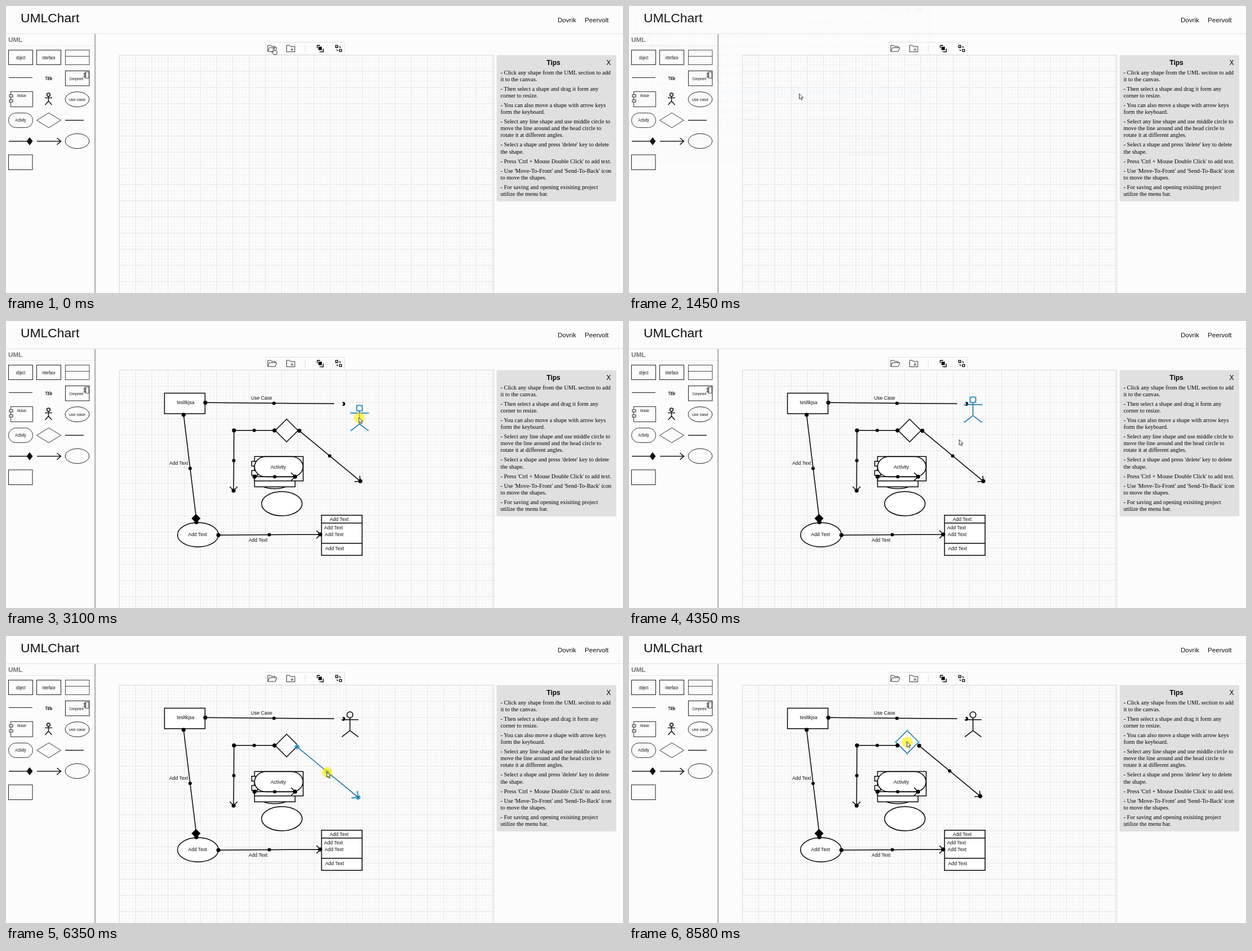
Recreate the animation shown at these times as an HTML page. Size 1096x511 px, loop 8630 ms.

```html
<!DOCTYPE html>
<html lang="en">
<head>
<meta charset="utf-8">
<title>UMLChart</title>
<style>
  html, body { margin: 0; width: 100%; height: 100%; overflow: hidden; background: #fcfcfc; }
  svg { display: block; width: 100vw; height: 100vh; }
  text { font-family: "Liberation Sans", Arial, sans-serif; fill: #111; stroke: none; white-space: pre; }
  .tips text { font-family: "Liberation Serif", "Times New Roman", serif; font-size: 10.36px; fill: #000; }
  .tips .head { font-family: "Liberation Sans", Arial, sans-serif; font-size: 12px; }
  .dialog text { font-family: "Open Sans", "Noto Sans", sans-serif; font-size: 8.2px; fill: #222; }
  .dialog .dim { fill: #5d6b7c; }
  .diagram text { font-size: 8.64px; }
  .shape { color: #000; stroke: currentColor; }
  .handle { display: none; fill: #d3efff; stroke: #1b95d2; stroke-width: .8; }
  .selected { color: #126c9e; }
  .selected .handle { display: inline; }
</style>
</head>
<body>
<svg viewBox="0 0 1096 511" preserveAspectRatio="none">
  <g id="page"></g>
  <g id="diagram" class="diagram" fill="none" stroke="#000" stroke-width="1.5"></g>
  <g id="dialog" class="dialog"></g>
  <circle id="glow" r="9.5" fill="#ffee00" opacity=".65"/>
  <g id="cursor" stroke="#222" stroke-width=".9" stroke-linejoin="round" fill="#fff">
    <path id="arrow" d="M0 0V9.6L2.2 7.6 3.8 11.2 5.4 10.5 3.9 7H7Z"/>
    <path id="hand" d="M-.9 1Q0-.6 1 1V5Q2 4.2 2.7 5.2 3.8 4.6 4.4 5.7 5.9 5.4 5.9 7V9.3L4.9 12H.2L-3.4 7.6Q-3.2 6.2-1.9 6.9L-.9 7.8Z"/>
  </g>
</svg>
<script>
const LOOP = 8630;
const $ = id => document.getElementById(id);

// Markup helpers
const rect = (x, y, w, h, extra = '') => `<rect x="${x}" y="${y}" width="${w}" height="${h}" ${extra}/>`;
const path = (d, extra = '') => `<path d="${d}" ${extra}/>`;
const dot = (x, y, r = 3.6) => `<circle cx="${x}" cy="${y}" r="${r}" fill="currentColor" stroke="none"/>`;
const oval = (x, y, rx, ry, extra = '') => `<ellipse cx="${x}" cy="${y}" rx="${rx}" ry="${ry}" ${extra}/>`;
const text = (x, y, s, extra = '') => `<text x="${x}" y="${y}" ${extra}>${s}</text>`;
const handle = (x, y) => rect(x - 1.1, y - 1.1, 2.2, 2.2, 'class="handle"');
const rhomb = (x, y, rx, ry, extra) =>
  path(`M${x - rx} ${y}L${x} ${y - ry}L${x + rx} ${y}L${x} ${y + ry}Z`, extra);

function header() {
  return rect(0, 0, 1096, 511, 'fill="#fcfcfc"') +
    text(26, 29, 'UMLChart', 'font-size="22.9"') +
    text(980, 29, 'Dovrik', 'font-size="11.6"') +
    text(1028, 29, 'Peervolt', 'font-size="11.6"') +
    path('M0 49.3H1096', 'stroke="#e2e2e2"') +
    path('M158.2 50V511', 'stroke="#8c8c8c" stroke-width="1.44"') +
    text(4, 63.5, 'UML', 'font-size="11.8" font-weight="bold" style="fill:#77776f"') +
    path('M0 70.5H157', 'stroke="#e8e8e8"');
}

function palette() {
  // The palette pictures are squeezed sideways, lettering included
  const label = (x, y, s, size, extra = '') =>
    `<g transform="translate(${x} ${y}) scale(.72 1)">` +
    text(0, 0, s, `font-size="${size}" text-anchor="middle" ${extra}`) + '</g>';
  return '<g fill="none" stroke="#1c1c1c" stroke-width="1">' +
    rect(4.5, 78.5, 43, 26) + rect(54.5, 78.5, 43, 26) +
    rect(105.5, 78.5, 42.5, 26, 'stroke-width=".8"') + path('M105.5 89.5H148', 'stroke-width=".8"') +
    path('M5 127.5H47', 'stroke-width="1.1"') +
    rect(105.5, 115.5, 42.5, 26.5) +
    path('M140.5 117.5H147V128.5H140.5ZM138.5 119.5H142V122H138.5ZM138.5 124H142V126.5H138.5Z', 'stroke-width=".8"') +
    rect(8.5, 152.5, 39, 27, 'stroke-width=".9"') +
    rect(6, 158, 6, 4, 'fill="#fcfcfc"') + rect(6, 167, 6, 4, 'fill="#fcfcfc"') +
    '<g stroke-width="1.6"><circle cx="75.5" cy="158" r="2.9"/>' +
    path('M75.5 161V169.5M69 163.5H82M69.5 176L75.5 169.5 81.5 176') + '</g>' +
    oval(126.5, 166.2, 21.3, 13.4) +
    rect(4.5, 190.5, 43, 26, 'rx="13" stroke-width=".9"') +
    rhomb(76, 203.5, 21.5, 13.2, 'stroke-width=".9"') +
    path('M105 203.5H138M5 240.8H40M55 240.8H97M90.5 235L97.5 240.8 90.5 246.8', 'stroke-width="1.6"') +
    rhomb(42, 240.8, 5, 6.6, 'fill="#111"') +
    oval(126.5, 240.5, 21.3, 13.2) +
    rect(4.5, 265, 42.5, 26.5) + '</g>' +
    label(26, 94.5, 'object', 8.5) + label(76, 94.5, 'interface', 8.5) +
    label(76, 131.5, 'Title', 8.5, 'font-weight="bold"') +
    label(125, 132, 'Component', 6.8) + label(28, 161.5, 'Module', 6.8) +
    label(26, 205.8, 'Activity', 8.5) +
    text(126.5, 168.8, 'use case', 'font-size="7.2" text-anchor="middle"');
}

function grid() {
  const lines = (step, color) => {
    let d = '';
    for (let x = 201.5 + step; x < 866; x += step) d += `M${x.toFixed(2)} 88V511`;
    for (let y = 87.5 + step; y < 511; y += step) d += `M202 ${y.toFixed(2)}H866`;
    return path(d, `stroke="${color}" stroke-width=".7"`);
  };
  return lines(5.76, '#f3f3f3') + lines(28.8, '#dfdfdf') +
    path('M201.5 511V87.5H866.5V511', 'fill="none" stroke="#d6d6d6"');
}

function toolbar() {
  const folder = x => path(`M${x} 81V70.2H${x + 5.5}L${x + 7} 72H${x + 13}V74`);
  return rect(461.5, 64.5, 140, 22.5, 'fill="#fcfcfc" stroke="#e2e2e2"') +
    '<g fill="none" stroke="#333" stroke-width="1" stroke-linejoin="round">' +
    folder(465) + path('M465 81L468 74.2H481L478.3 81Z') +
    path('M498.5 81.5V70H503.5L505 72H513V81.5ZM508 74.5V79M505.8 77L508 79.3 510.2 77') + '</g>' +
    path('M531.5 69V82', 'stroke="#dcdcdc"') +
    rect(555, 72.5, 6, 6, 'fill="#000"') +
    '<g fill="none" stroke="#000" stroke-width="1.4">' +
    path('M553 75V70.2H558M558.5 81.5H563.5V76M557 81.5H558') +
    path('M585.6 70.2H589.4V74H585.6ZM592.4 77.4H596.2V81.2H592.4Z', 'stroke-width="1.3"') +
    path('M591.5 72.5H593.6V75M588 77V79.2H590.2', 'stroke-width="1.1"') + '</g>';
}

function tips() {
  const rows = [
    [118, '- Click any shape from the UML section to add'], [130, 'it to the canvas.'],
    [147.5, '- Then select a shape and drag it form any'], [159.7, 'corner to resize.'],
    [176.2, '- You can also move a shape with arrow keys'], [188.4, 'form the keyboard.'],
    [205.4, '- Select any line shape and use middle circle to'], [217.5, 'move the line around and the head circle to'],
    [229.7, 'rotate it at different angles.'],
    [246.8, "- Select a shape and press 'delete' key to delete"], [259, 'the shape.'],
    [276, "- Press 'Ctrl + Mouse Double Click' to add text."],
    [293, "- Use 'Move-To-Front' and 'Send-To-Back' icon"], [305, 'to move the shapes.'],
    [322, '- For saving and opening exisiting project'], [334.3, 'utilize the menu bar.']
  ];
  return '<g class="tips">' + rect(871.5, 87.5, 212.5, 260.5, 'rx="2" fill="#e0e0e0"') +
    text(972.5, 104.6, 'Tips', 'class="head" font-weight="bold" text-anchor="middle"') +
    text(1070.5, 104.6, 'X', 'class="head" text-anchor="middle"') +
    rows.map(([y, s]) => text(878.5, y + 3.5, s.replace(/^-/, '<tspan font-weight="bold">-</tspan>'))).join('') + '</g>';
}

function diagram() {
  const white = 'fill="#fff"';
  return rect(281.5, 128.5, 72, 36.5, white) + text(303.5, 148.3, 'tesltkjsa') +
    path('M354 145.3L583 147.3') + dot(354, 145.3) + dot(476, 146.4, 3) + text(435, 140.2, 'Use Case') +
    dot(599, 147.4, 3.5) + '<circle cx="596.2" cy="147.4" r="2.8" fill="#fcfcfc" stroke="none"/>' +
    oval(341, 380.7, 36.3, 21.6, white) + text(323.5, 382.7, 'Add Text') +
    path('M315.5 167L338 352') + dot(315.5, 167) + dot(327, 262.5, 3) +
    rhomb(337.5, 351.5, 7, 7, 'fill="#000"') + dot(338.2, 358.2) + text(290, 256.2, 'Add Text') +
    rect(560.5, 345.8, 72, 71.5, white) + path('M560.5 359.8H632.5M560.5 395.8H632.5') +
    text(575, 356.3, 'Add Text') + text(565, 371, 'Add Text') + text(566, 382.6, 'Add Text') + text(567, 408, 'Add Text') +
    path('M377 381.3L558 380M551.5 373.2L558.5 380 551.5 387') + dot(377.3, 381.2) + dot(467.7, 380.6, 3) + dot(558, 380) +
    text(431, 392.6, 'Add Text') +
    oval(490, 325.3, 36, 21.5, white) + oval(477, 277, 36, 21.6, white) +
    rect(441.5, 259, 72, 36.3, white) + rect(441.5, 241.3, 86.3, 43.4, white) +
    rect(436.5, 249.8, 10.5, 8.5, white) + rect(436.5, 266.3, 10.5, 8.5, white) +
    rect(441.5, 241.5, 86, 36, 'rx="20" fill="#fff"') + text(470, 263.2, 'Activity') +
    path('M441.5 277.2H513.5M506.5 270L513.5 277.2 506.5 284.2') + dot(441.5, 277.2) + dot(477.3, 277.2, 3) + dot(513.5, 277.2) +
    '<g id="diamond" class="shape">' + rhomb(498.5, 195, 20.3, 20.3, white) +
    handle(478.2, 195) + handle(518.8, 195) + handle(498.5, 174.7) + handle(498.5, 215.3) + '</g>' +
    path('M405 194.8H477M405 194.8L404.3 302M397.5 295L404.3 302 411 295') +
    dot(405, 194.8) + dot(441, 194.8, 3) + dot(477, 194.8) + dot(404.7, 248.5, 3) + dot(404.3, 302) +
    '<g id="link" class="shape">' + path('M521 195.3L629.3 285.2M628.3 275.5L629.3 285.2 619 286.2') +
    dot(521, 195.3) + dot(575, 240.2, 3) + dot(629.3, 285.2) +
    [[521, 195.3], [575, 240.2], [629.3, 285.2]].map(([x, y]) =>
      handle(x - 3, y) + handle(x + 3, y) + handle(x, y - 3) + handle(x, y + 3)).join('') +
    handle(628.3, 275.5) + handle(619.5, 286.2) + '</g>' +
    '<g id="actor" class="shape"><circle cx="611" cy="140.3" r="5.3"/>' +
    path('M611 145.6V168.5M596.3 149H626M596.5 179.7L611 168.5 625.8 179.7') +
    [[596.3, 149], [626, 149], [596.5, 179.7], [625.8, 179.7], [606.7, 136], [615.3, 136], [606.7, 144.6], [615.3, 144.6]]
      .map(p => handle(...p)).join('') + '</g>';
}

function dialog() {
  const chevron = (x, y, a, b) => path(`M${x - a} ${y - b}L${x} ${y}L${x + a} ${y - b}`, 'fill="none" stroke="#555"');
  const side = (x, y, s) => path(`M${x + s} ${y - 2.5}L${x} ${y}L${x + s} ${y + 2.5}`, 'fill="none" stroke="#555"');
  const places = [
    [72, '3D Objects', '#2f9fd8'], [89, 'Desktop', '#1c8ad8'], [106, 'Documents', '#8fa7b8'],
    [123, 'Downloads', '#2b82cf'], [140, 'Music', '#2b8fdc'], [157, 'Pictures', '#5fa3c6'],
    [174, 'Videos', '#4a5560'], [191.5, 'Local Disk (C:)', '#8b98a3'], [209, 'Personal (D:)', '#70777d']
  ];
  const icon = (name, y, c) => {
    if (name === 'Downloads') return path(`M30.5 ${y - 4.5}H34.5V${y}H37.5L32.5 ${y + 5}L27.5 ${y}H30.5Z`, `fill="${c}"`);
    if (name === 'Music') return oval(31, y + 3, 2, 1.7, `fill="${c}"`) + path(`M32.5 ${y + 3}V${y - 5}L35.5 ${y - 1}`, `fill="none" stroke="${c}" stroke-width="1.4"`);
    if (name === 'Desktop') return rect(27, y - 4, 11, 8, `fill="${c}"`);
    if (name.endsWith(':)')) return rect(27.5, y + 1, 10, 3, `fill="${c}"`);
    const tall = name === 'Documents' || name === 'Videos';
    return rect(tall ? 28 : 27, y - (tall ? 4.5 : 3.5), tall ? 8.5 : 10.5, tall ? 9.5 : 7.5, `fill="${c}"`) +
      path(`M29.5 ${y + 1}H35`, 'stroke="#fff" stroke-width="1.3"');
  };
  let files = rect(118, 148, 422, 17, 'fill="#cce8ff"');
  for (let i = 0; i < 10; i++) {
    const y = 54.5 + i * 17;
    files += rect(133, y - 4, 7, 8, 'fill="#e8eef3" stroke="#8a9aa8" stroke-width=".7"') +
      text(146, y + 3, 'project_' + (1586321840284 + i * 73911407)) +
      text(316, y + 3, `4/${8 + i}/2020 ${1 + i % 9}:${12 + i * 4} PM`, 'class="dim"') +
      text(419, y + 3, 'JSON File', 'class="dim"') + text(504, y + 3, 3 + i % 4 + ' KB', 'class="dim"');
  }
  const shadow = [1, 2, 3, 4, 5].map(n =>
    rect(3.5 - n * .7, -20, 539 + n * 1.7, 302.3 + n * 1.2, 'rx="2" fill="#000" opacity=".05"')).join('');
  return shadow +
    rect(3.5, -20, 539, 302.3, 'fill="#fff" stroke="#8f8f8f" stroke-width=".9"') +
    rect(4, -20, 538, 33.5, 'fill="#f6f7f8"') + rect(4, 226, 538, 56, 'fill="#f2f2f2"') +
    text(16, 9, 'Organize') + path('M53.5 4.8H58.5L56 7.3Z', 'fill="#444"') + text(79, 9, 'New folder') +
    path('M455 2.5H458M455 6H458M455 9.5H458M460 2.5H466M460 6H466M460 9.5H466', 'stroke="#9aa4ac" stroke-width="1.2"') +
    path('M473 4.5H478L475.5 7Z', 'fill="#444"') +
    rect(494, 2, 10, 8, 'fill="#fff" stroke="#52809e"') + rect(499.5, 3, 4, 6.5, 'fill="#4ba0df"') +
    '<circle cx="525" cy="6" r="6" fill="#1569b5"/>' + text(525, 9.2, '?', 'text-anchor="middle" font-weight="bold" style="fill:#fff"') +
    text(130, 30, 'Name', 'class="dim"') + text(316, 30, 'Date modified', 'class="dim"') +
    text(419, 30, 'Type', 'class="dim"') + text(504, 30, 'Size', 'class="dim"') +
    path('M312.5 18V36M415.5 18V36M500.5 18V36', 'stroke="#dedede"') +
    path('M360 20.5L363 18 366 20.5', 'fill="none" stroke="#888"') +
    '<circle cx="27" cy="31.5" r="4.5" fill="#1a72c4"/>' + text(35, 34.4, 'FogShelf') +
    rect(24.5, 50.5, 8, 6, 'fill="#4da3d9"') + path('M23.5 58.5H31', 'stroke="#6d7b86"') + text(35, 57.4, 'This PC') +
    rect(4, 114.3, 99, 17, 'fill="#d9d9d9"') +
    places.map(([y, s, c]) => icon(s, y, c) + text(41, y + 3, s)).join('') +
    rect(27.5, 187, 4, 4, 'fill="#2b9be0"') +
    rect(104, 18, 11, 206, 'fill="#f0f0f0"') + rect(104, 112, 10.5, 90, 'fill="#cdcdcd"') +
    path('M106.5 24.5L109.3 21.8 112 24.5', 'fill="none" stroke="#555"') + chevron(109.3, 219.5, 2.7, 2.7) +
    rect(118, 213, 422, 11, 'fill="#f0f0f0"') + rect(130, 213, 378.5, 10.5, 'fill="#cdcdcd"') +
    side(122, 218.3, 3) + side(537, 218.3, -3) +
    `<g id="wait">${text(302, 55, 'Working on it...', 'class="dim"')}</g><g id="files">${files}</g>` +
    text(127, 244.7, 'File name:', 'text-anchor="end"') +
    rect(130.5, 233.8, 256.5, 16, 'fill="#fff" stroke="#3f93d6"') + path('M132.5 236V247', 'stroke="#222" stroke-width=".8"') + chevron(381.5, 243, 2.6, 2.6) +
    rect(395.5, 233.8, 134.5, 15.5, 'fill="#e4e4e4" stroke="#adadad"') + text(398.5, 244.7, 'Custom Files') + chevron(524, 243, 2.6, 2.6) +
    rect(397, 255, 61, 16.8, 'fill="#e1e1e1" stroke="#0f78d1" stroke-width="1.5"') + text(427.5, 266.6, 'Open', 'text-anchor="middle"') +
    rect(467.5, 255, 62.5, 16.8, 'fill="#e1e1e1" stroke="#adadad"') + text(498.5, 266.6, 'Cancel', 'text-anchor="middle"') +
    path('M534 280L540 274M537 280L540 277', 'stroke="#aaa"');
}

$('page').innerHTML = header() + palette() + grid() + toolbar() + tips();
$('diagram').innerHTML = diagram();
$('dialog').innerHTML = dialog();

// Tracks: [ms, value, value]
const pointer = [[0, 475.5, 74.5], [700, 475.5, 74.5], [720, 475, 73], [1110, 475, 73], [1290, 302.5, 156], [1520, 302.5, 156],
  [1700, 540, 166], [1770, 540, 166], [1900, 566, 164], [2120, 610, 157], [4240, 610, 157], [4410, 574, 240],
  [6740, 574, 240], [6900, 503.5, 194.5]];
const actorMove = [[2410, 0, 0], [2600, 18, -16], [2800, 33, -9], [2950, 28, 7], [3100, 17, 15],
  [3220, 6, 7], [3290, 6, 7], [3480, 4, 0], [3730, 4, 0], [3990, 0, 0]];
const linkMove = [[4980, 0, 0], [5200, 16, 9], [5400, 33, 25], [5550, 32, 27], [5700, 20, 20], [5810, 10, 11],
  [5860, 10, 11], [6100, 2, 6], [6350, -4, 2], [6670, -5.5, 0]];
const diamondMove = [[7170, 0, 0], [7350, 33.5, 22], [7500, 46, 12], [7660, 40, -8], [7800, 25, -19],
  [8000, 12, -20], [8070, 12, -20], [8300, 3, -13], [8580, -4.3, -6.2]];
const fade = [[900, 0, .93], [960, .5, .97], [1030, .89, 1], [1090, 1, 1], [1380, 1, 1], [1450, .03, .965], [1520, 0, .95]];
const presses = [[340, 690], [1310, 1400], [2150, 3990], [4660, 6720], [6900, LOOP]];

function at(track, t) {
  const i = track.findIndex(k => k[0] > t);
  if (i === 0) return track[0].slice(1);
  if (i < 0) return track[track.length - 1].slice(1);
  const a = track[i - 1], b = track[i], p = (t - a[0]) / (b[0] - a[0]);
  return [1, 2].map(n => a[n] + (b[n] - a[n]) * p);
}
const show = (id, on) => { $(id).style.display = on ? '' : 'none'; };
const move = (id, [x, y]) => $(id).setAttribute('transform', `translate(${x} ${y})`);
const select = (id, on) => $(id).classList.toggle('selected', on);

function draw(t) {
  const moves = [at(actorMove, t), at(linkMove, t), at(diamondMove, t)];
  ['actor', 'link', 'diamond'].forEach((id, i) => move(id, moves[i]));
  select('actor', t >= 2150 && t < 4660);
  select('link', t >= 4660 && t < 6900);
  select('diamond', t >= 6900);
  show('diagram', t >= 1640);

  const [opacity, scale] = at(fade, t);
  show('dialog', opacity > 0);
  $('dialog').setAttribute('opacity', opacity);
  $('dialog').setAttribute('transform', `translate(272 55) scale(${scale}) translate(-272 -55)`);
  show('wait', t < 1140);
  show('files', t >= 1140);

  // Dragged shapes carry the pointer with them
  const pos = moves.reduce((p, m) => [p[0] + m[0], p[1] + m[1]], at(pointer, t));
  move('cursor', pos);
  move('glow', [pos[0] + .7, pos[1] + .7]);
  show('glow', presses.some(([a, b]) => t >= a && t < b));
  show('hand', t < 720);
  show('arrow', t >= 720);
}

const start = performance.now();
function tick() {
  draw((performance.now() - start) % LOOP);
  requestAnimationFrame(tick);
}
tick();
</script>
</body>
</html>
```
